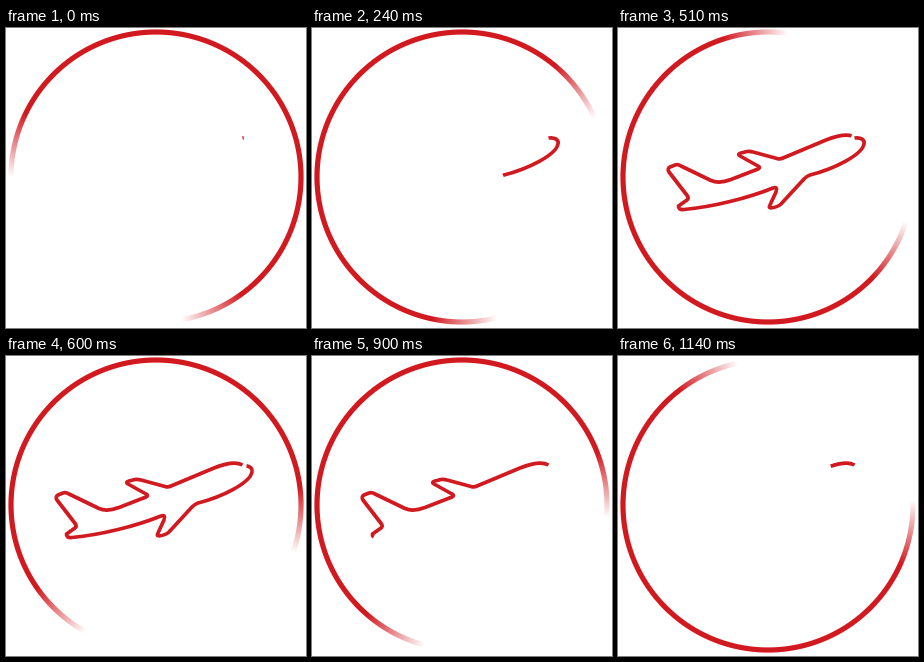
An HTML page for the animation above (1.17 s loop, 300x300 px).

```html
<!DOCTYPE html>
<html lang="en">
<head>
<meta charset="utf-8">
<title>Plane loader</title>
<style>
  html, body { margin: 0; width: 100%; height: 100%; overflow: hidden; background: #fff; }
  #stage { position: relative; width: 300px; height: 300px; }
  #ring, svg { position: absolute; inset: 0; width: 300px; height: 300px; }
  #ring {
    --clear: rgba(209, 25, 32, 0);
    background: conic-gradient(from var(--gap) at 150px 149px,
      var(--clear) 50deg, #d11920 76deg 284deg, var(--clear) 310deg);
    -webkit-mask: radial-gradient(circle at 150px 149px,
      #0000 141.9px, #000 142.9px 147.1px, #0000 148.1px);
    mask: radial-gradient(circle at 150px 149px,
      #0000 141.9px, #000 142.9px 147.1px, #0000 148.1px);
  }
  path { fill: none; stroke: #d11920; stroke-width: 3.7; stroke-linejoin: round; }
</style>
</head>
<body>
<div id="stage">
  <div id="ring"></div>
  <svg viewBox="0 0 300 300">
    <path id="plane" pathLength="1" d="M236.5 110C243 109 247 112 246 116C244 127 216 141 192 147
      Q189 148 186 151L163 176Q160 179 153 180C151 180 151 179 152 177L158 164Q160 158 155 160
      C130 170 95 179 66 181.5Q60 182 60.5 178L69 172Q71 170.5 69.5 168L51 144Q49 140.5 52 139
      L57 137Q60 136 63 138L93 152.5Q101 156 113 151.5L140 141Q143 139.5 140 138L122 128
      Q119 126 123 125L129 123.5Q132 123 135 124L159 130.5Q162 131.5 165 130L208 112
      Q228 104 236.5 109"/>
  </svg>
</div>
<script>
const LOOP = 1170, STEP = 30;
const ring = document.getElementById('ring');
const plane = document.getElementById('plane');

// [time, value] keys, joined by smooth curves
const gapAngle = [[0, 130], [240, 386], [390, 564], [510, 688], [720, 927], [900, 1135], [1140, 1388], [1170, 1421]];
const erased = [[570, 0], [720, .06], [900, .458], [1140, .955], [1200, 1]];

function slope(keys, i) {
  const a = keys[Math.max(i - 1, 0)], b = keys[Math.min(i + 1, keys.length - 1)];
  return (b[1] - a[1]) / (b[0] - a[0]);
}

function track(keys, t) {
  if (t <= keys[0][0]) return keys[0][1];
  const i = keys.findIndex(k => k[0] > t) - 1;
  const [t0, v0] = keys[i], [t1, v1] = keys[i + 1];
  const d = t1 - t0, u = (t - t0) / d, w = 1 - u;
  return v0 * w * w * (1 + 2 * u) + v1 * u * u * (3 - 2 * u)
    + d * u * w * (w * slope(keys, i) - u * slope(keys, i + 1));
}

function easeInOut(p, power) {
  return p < .5 ? (2 * p) ** power / 2 : 1 - (2 - 2 * p) ** power / 2;
}

function render(now) {
  const t = Math.floor(now % LOOP / STEP) * STEP;
  const head = Math.max(.002, easeInOut(Math.min(t / 630, 1), 4.6));
  const tail = track(erased, t);
  ring.style.setProperty('--gap', track(gapAngle, t) + 90 + 'deg');
  plane.style.strokeDasharray = `0 ${tail} ${head - tail} 2`;
}

const start = performance.now();
function tick() {
  render(performance.now() - start);
  requestAnimationFrame(tick);
}
tick();
</script>
</body>
</html>
```
